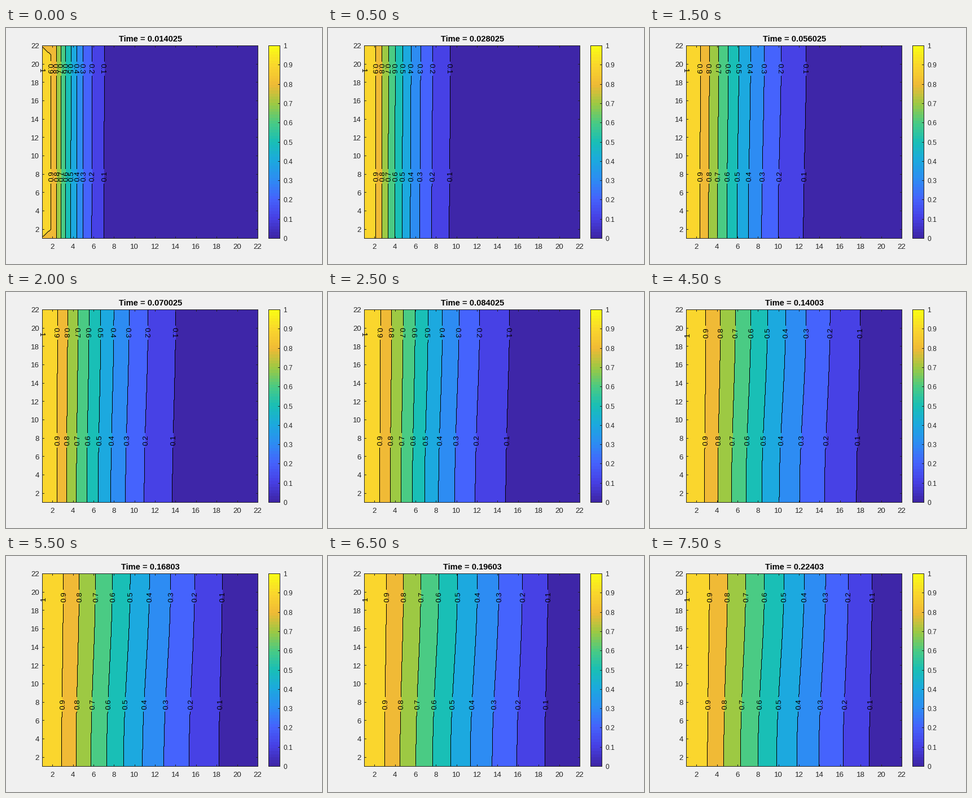
Recreate the animation shown at these times as a matplotlib script. Size 560 by 420 pixels, loop 8000 ms.

```python
import numpy as np
import matplotlib.pyplot as plt
from matplotlib.animation import FuncAnimation
from matplotlib.colors import to_rgb

W, H, DPI = 560, 420, 100
FRAMES, INTERVAL = 16, 500
LEFT, RIGHT, TOP, BOTTOM = 64.5, 446.5, 31.5, 374.5
BAR_L, BAR_R = 465.5, 485.5
INK = (0.15, 0.15, 0.15)
HAIR = 72 / DPI      # one pixel
LABEL_ROWS = (72.5, 264)
GAP = 13

# One key colour per tenth, blended into a 64-step bar
KEYS = ("#3e26a8 #4741e5 #4563fd #2d8cf3 #1ca9df #19bfb6 "
        "#4acb84 #9dc943 #f0ba36 #fad62d #f9fb15").split()
BANDS = np.array([to_rgb(c) for c in KEYS])
BAR = np.column_stack([np.interp(np.arange(64), np.arange(11) * 6.3, c)
                       for c in BANDS.T])
LEVELS = np.arange(1, 10) / 10

plt.rcParams["font.family"] = "Liberation Sans"
fig = plt.figure(figsize=(W / DPI, H / DPI), dpi=DPI, facecolor="#f0f0f0")
ax = fig.add_axes([0, 0, 1, 1])


def px(x):
    return LEFT + (x - 1) * (RIGHT - LEFT) / 21


def py(y):
    return BOTTOM - (y - 1) * (BOTTOM - TOP) / 21


def centre(v):
    """Move a coordinate to the middle of its pixel."""
    return np.floor(v) + 0.5


def write(x, y, s, size=13.33, ha="center", color=INK, **kw):
    return ax.text(x, y, s, fontsize=size * 72 / DPI, ha=ha, va="baseline",
                   color=color, **kw)


def stroke(xs, ys, color=INK, z=4):
    line, = ax.plot(centre(xs), centre(ys), color=color, lw=HAIR, zorder=z,
                    snap=False, solid_capstyle="projecting")
    return line


def frame_box(x0, x1):
    stroke([x0, x1, x1, x0, x0], [TOP, TOP, BOTTOM, BOTTOM, TOP])


def draw_axes():
    frame_box(LEFT, RIGHT)
    for n in range(2, 23, 2):
        x, y = px(n), py(n)
        for a, d in ((BOTTOM, -3), (TOP, 3)):
            stroke([x, x], [a, a + d])
        for a, d in ((LEFT, 3), (RIGHT, -3)):
            stroke([a, a + d], [y, y])
        write(x - 0.5, 393, str(n))
        write(59, y + 5, str(n), ha="right")


def draw_bar():
    ax.imshow(BAR[:, None, :], extent=(BAR_L, BAR_R, BOTTOM, TOP), origin="lower",
              aspect="auto", interpolation="nearest", zorder=1)
    frame_box(BAR_L, BAR_R)
    for k in range(11):
        y = BOTTOM - k * (BOTTOM - TOP) / 10
        stroke([BAR_R - 3, BAR_R], [y, y])
        write(491, y + 4.5, f"{k / 10:g}", size=12, ha="left")


nodes = np.arange(1, 23)
GX, GY = np.meshgrid((nodes - 1.5) / 20, np.clip((nodes - 1.5) / 20, 0, 1))
PX, PY = np.meshgrid(px(nodes), py(nodes))


def field(t):
    """Heat spreading from the hot left wall, tilted by a slow circulation."""
    tilt = 0.0368 * (1 - np.exp(-(t / 0.0908) ** 1.5))
    x = GX + tilt / 2 * np.cos(np.pi * GY) * np.sin(np.pi * np.clip(GX, 0, 1))
    u = 1 - x
    for n in range(1, 41):
        k = n * np.pi
        u -= 2 / k * np.exp(-k * k * t) * np.sin(k * x)
    u = np.clip(u, 0, 1)
    u[1:-1, 0] = 1
    u[[0, -1], 0] = u[[0, -1], 1]
    u[:, -1] = 0
    return u


def clock(t):
    # the summed time steps drift slightly upwards
    return f"Time = {t + (t - 0.113) * 1e-6:.5g}"


def dense(seg):
    """Walk a polyline pixel by pixel, leaving gaps behind the labels."""
    d = np.r_[0, np.cumsum(np.abs(np.diff(seg, axis=0)).max(axis=1))]
    s = np.linspace(0, d[-1], int(d[-1]) + 1)
    x, y = np.interp(s, d, seg[:, 0]), np.interp(s, d, seg[:, 1])
    for row in LABEL_ROWS:
        x[np.abs(y - row) < GAP] = np.nan
    return x, y


draw_axes()
draw_bar()
title = write(256, 24, "", size=14.67, color="black", weight="bold")
ax.set_xlim(0, W)
ax.set_ylim(H, 0)
ax.autoscale(False)
ax.axis("off")
live = []


def tag(x, y, s, turn):
    shift = 5.6 * np.sign(turn) - 0.7
    live.append(write(x + shift, y, s, rotation=turn, rotation_mode="anchor",
                      color="black", zorder=5))


def update(i):
    while live:
        live.pop().remove()
    t = 0.014025 + 0.014 * i
    u = field(t)
    title.set_text(clock(t))
    live.append(ax.contourf(PX, PY, u, levels=[-1, *LEVELS, 2],
                            colors=BANDS[:10], zorder=1))
    lines = ax.contour(PX, PY, u, levels=LEVELS)
    segs = lines.allsegs
    lines.remove()

    turns = (-90 if t < 0.09 else 90, 90)
    for level, parts in zip(LEVELS, segs):
        for seg in parts:
            if len(seg) < 2:
                continue
            live.append(stroke(*dense(seg), color="black", z=3))
            order = np.argsort(seg[:, 1])
            for row, turn in zip(LABEL_ROWS, turns):
                x = np.interp(row, seg[order, 1], seg[order, 0])
                tag(x, row, f"{level:.1f}", turn)
    tag(LEFT + 1, 76, "1", turns[0])
    return [title]


anim = FuncAnimation(fig, update, frames=FRAMES, interval=INTERVAL,
                     init_func=lambda: [title], repeat=True, repeat_delay=0,
                     blit=False)
plt.show()
```
